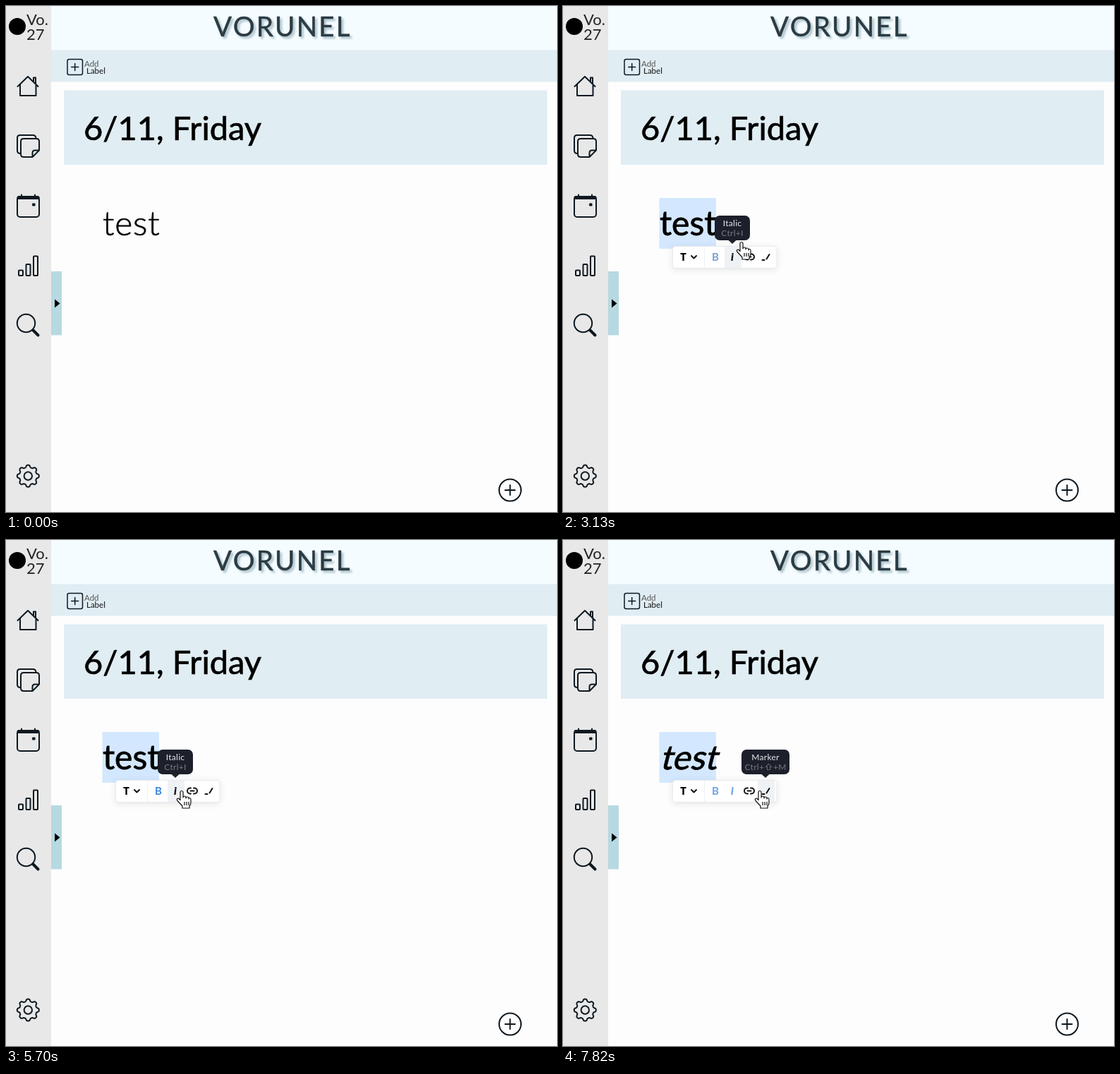
An HTML page for the animation above (7.99 s loop, 781 by 717 pixels).

```html
<!DOCTYPE html>
<html lang="en">
<head>
<meta charset="utf-8">
<title>Note editor</title>
<style>
  html, body { margin: 0; width: 100%; height: 100%; overflow: hidden; background: #fdfdfd; }
  svg { display: block; width: 100vw; height: 100vh; font-family: Lato, Inter, sans-serif; }
  .line { fill: none; stroke: #0d1820; stroke-width: 2; stroke-linejoin: round; stroke-linecap: round; }
  .title { font-size: 47px; stroke: #000; stroke-width: .7; }
  .plain { font-weight: 300; letter-spacing: .8px; stroke: #000; stroke-width: .6; }
  .strong { stroke: #000; stroke-width: .8; }
  .brand { font-size: 38.5px; letter-spacing: 2.3px; fill: #2b3b43; stroke: #2b3b43; stroke-width: .5;
           filter: drop-shadow(3px 3px 1.5px rgba(70, 110, 125, .4)); }
  .bar { filter: drop-shadow(0 2px 4px rgba(13, 20, 33, .1)); }
  .glyph { fill: none; stroke: #111; stroke-width: 2; stroke-linecap: round; stroke-linejoin: round; }
  .tip { font-size: 12px; letter-spacing: .3px; text-anchor: middle; }
</style>
</head>
<body>
<svg viewBox="0 0 781 717" preserveAspectRatio="none">
  <rect width="781" height="717" fill="#fdfdfd"/>
  <rect width="64" height="717" fill="#e8e8e8"/>
  <rect x="64" width="717" height="62.5" fill="#f4fcff"/>
  <rect x="64" y="62.5" width="717" height="45" fill="#e0edf3"/>
  <rect x="82" y="119.5" width="685" height="105.5" fill="#e0edf3"/>
  <rect x="64" y="376" width="15" height="90.5" fill="#b7d9e1"/>
  <path d="M69 415.5L76.5 421.5L69 427.5Z"/>

  <circle cx="16" cy="29" r="12"/>
  <g font-size="22" fill="#222">
    <text x="29" y="27">Vo.</text>
    <text x="29" y="48">27</text>
  </g>
  <text class="brand" x="392" y="43" text-anchor="middle">VORUNEL</text>

  <g class="line">
    <path d="M16.5 114L31 100L45.5 114M20 111V127H42.5V111M39 107V101.5H42V110"/>
    <path d="M20.5 209Q16 209 16 205V187Q16 183 20 183H38Q42 183 42.5 187"/>
    <path d="M25 188H43Q47 188 47 192V204.5L37.5 214H25Q21 214 21 210V192Q21 188 25 188ZM37.5 214V208Q37.5 204.5 41 204.5H47"/>
    <rect x="16" y="270" width="31" height="29" rx="4"/>
    <path d="M18 271.5H45" stroke-width="5"/>
    <path d="M22 267.5V270M41 267.5V270"/>
    <rect x="38" y="280" width="3" height="3" fill="#0d1820" stroke-width="1"/>
    <rect x="18" y="374.5" width="6" height="7.5" rx="1"/>
    <rect x="28.500" y="366" width="6" height="16" rx="1"/>
    <rect x="39" y="354.5" width="6" height="27.5" rx="1"/>
    <circle cx="28.5" cy="449.5" r="12.7"/>
    <path d="M38.5 459.5L45.5 466.5" stroke-width="4"/>
    <path id="gear"/>
    <circle cx="31.3" cy="666" r="5.7"/>
    <circle cx="714.5" cy="686" r="15.5"/>
    <path d="M714.5 679V693M707.5 686H721.5"/>
    <g stroke-width="1.5">
      <rect x="87" y="75.5" width="21.5" height="22" rx="2.5"/>
      <path d="M97.7 81.5V91.5M92.7 86.5H102.7"/>
    </g>
  </g>
  <text x="111" y="86" font-size="11.5" fill="#555">Add</text>
  <text x="114" y="96" font-size="11.5" fill="#111">Label</text>
  <text class="title" x="110" y="190">6/11, Friday</text>

  <rect id="selection" y="272" height="72" fill="#d3e8fe"/>
  <g transform="translate(137 325)"><text id="word" font-size="48">test</text></g>

  <g id="toolbar">
    <rect class="bar" x="155.5" y="340.5" width="147.5" height="31" rx="4" fill="#fff" stroke="#e9eaed"/>
    <rect id="hover" y="341" width="24" height="30" fill="#eff2f5"/>
    <path d="M200.5 341V371" stroke="#eeeff2"/>
    <text x="170.5" y="360.5" font-size="14" font-weight="900" text-anchor="middle">T</text>
    <path class="glyph" d="M182 354L185.5 357.5L189 354"/>
    <text id="bold" x="216" y="360.5" font-size="15" font-weight="700" text-anchor="middle">B</text>
    <text id="italic" x="240" y="360.5" font-size="15" font-weight="900" font-style="italic" text-anchor="middle">i</text>
    <path class="glyph" d="M262 351.5H261A4 4 0 0 0 261 359.5H262M266 351.5H267A4 4 0 0 1 267 359.5H266M261.5 355.5H266.5"/>
    <path class="glyph" d="M282.5 360H285.5M288.5 358.5L292.5 352"/>
  </g>

  <g id="tooltip">
    <rect id="tipBox" y="297" height="35" rx="7" fill="#1d202b"/>
    <path d="M-6 331.5H6L0 337Z" fill="#1d202b"/>
    <text class="tip" id="tipName" y="312" fill="#e8e9ee"></text>
    <text class="tip" id="tipKeys" y="325.5" fill="#757985"></text>
  </g>

  <g id="cursor">
    <circle id="press" r="17" fill="#f6ee19" fill-opacity=".72"/>
    <path id="arrow" d="M0 0V16L4 12.5L6.5 18.5L9 17.3L6.5 11.5H12Z" fill="#fff" stroke="#111"/>
    <g id="beam" fill="none">
      <path d="M-5 -11H-2Q0 -11 0 -9V9Q0 11 -2 11H-5M5 -11H2Q0 -11 0 -9V9Q0 11 2 11H5" stroke="#fff" stroke-width="3"/>
      <path d="M-5 -11H-2Q0 -11 0 -9V9Q0 11 -2 11H-5M5 -11H2Q0 -11 0 -9V9Q0 11 2 11H5" stroke="#111" stroke-width="1.2"/>
    </g>
    <path id="hand" fill="#fff" stroke="#111" stroke-width="1.2" stroke-linejoin="round"
      d="M-2 1.5a2 2 0 0 1 4 0V9q0-2 2-2t2 2v1q0-2 2-2t2 2v1q0-1.5 1.5-1.5T13 11.5V16q0 3-2 5v3H1v-3L-6 13.5q-1.5-2 0-3t2.5.5L-2 12.5ZM4 15v5M7 15v5M10 15v5"/>
  </g>
</svg>
<script>
const LOOP = 7990;
const BOLD_AT = 2700, ITALIC_AT = 5870;
const el = Object.fromEntries([...document.querySelectorAll('[id]')].map(node => [node.id, node]));

// Pointer stops: time, x, y
const path = [
  [130, 739, 717], [900, 279, 310], [930, 279, 310], [1090, 209, 306], [1220, 209, 306],
  [1700, 226, 304], [1800, 226, 304], [2150, 113, 304], [2190, 113, 304], [2500, 207, 354],
  [2560, 207, 354], [2650, 214, 358], [3080, 214, 358], [3130, 253, 335], [3160, 253, 335],
  [3450, 300, 312], [3600, 300, 312], [3840, 226, 304], [4190, 226, 304], [4570, 145, 304],
  [4800, 134, 304], [4900, 134, 304], [5460, 249, 356], [6000, 249, 356], [6200, 300, 312],
  [6340, 300, 312], [6580, 226, 304], [6660, 226, 304], [6950, 165, 305], [7140, 143, 304],
  [7230, 143, 304], [7630, 280, 358], [7819, 280, 358], [7820, 279, 356]
];

// Selections: press, preview of the toolbar, release, deselect, tint of active tools
const drags = [
  { down: 1790, preview: 2040, up: 2180, clear: 3480, tint: '#779fd0' },
  { down: 4180, preview: 4510, up: 4860, clear: 6210, tint: '#3a86dd' },
  { down: 6650, preview: 6890, up: 7215, clear: LOOP, tint: '#6aa3e8' }
];
const clicks = [[2650, 2760], [3470, 3570], [5840, 5950], [6200, 6300]];
const tips = [
  { from: 2590, to: 3090, x: 216, width: 52, name: 'Bold', keys: 'Ctrl+B' },
  { from: 3090, to: 3240, x: 240, width: 50, name: 'Italic', keys: 'Ctrl+I' },
  { from: 5580, to: 6060, x: 240, width: 50, name: 'Italic', keys: 'Ctrl+I' },
  { from: 7540, to: LOOP, x: 287, width: 68, name: 'Marker', keys: 'Ctrl+⇧+M' }
];

const clamp = v => Math.max(0, Math.min(1, v));
const ease = v => v * v * (3 - 2 * v);
const set = (node, attrs) => Object.entries(attrs).forEach(([k, v]) => node.setAttribute(k, v));
const show = (node, on) => { node.style.display = on ? '' : 'none'; };

function pointer(t) {
  const next = path.findIndex(stop => stop[0] > t);
  if (next < 0) return path[path.length - 1].slice(1);
  if (next === 0) return path[0].slice(1);
  const a = path[next - 1], b = path[next];
  const k = ease((t - a[0]) / (b[0] - a[0]));
  return [a[1] + (b[1] - a[1]) * k, a[2] + (b[2] - a[2]) * k];
}

// Left edge of the selection, snapped to a letter
function selectionStart(x) {
  if (x < 144) return 136.5;
  if (x < 163) return 153;
  if (x < 188) return 178.5;
  return x < 208 ? 201 : 217;
}

function drawToolbar(t, drag) {
  show(el.toolbar, drag && t >= drag.preview);
  if (!drag) return;
  const since = t - drag.up - 40;
  const shown = since >= 0;
  const grow = ease(clamp(since / 150));
  const fade = shown ? .25 + .75 * clamp(since / 220) : .25 * clamp((t - drag.preview) / 50);
  const dx = shown ? 0 : 22.5;
  const dy = 4.5 * (1 - grow);
  set(el.toolbar, {
    opacity: fade,
    transform: `translate(${229 + dx} ${355.5 + dy}) scale(${.94 + .06 * grow}) translate(-229 -355.5)`
  });
  el.bold.style.fill = t >= BOLD_AT ? drag.tint : '#111';
  el.italic.style.fill = t >= ITALIC_AT ? drag.tint : '#111';
}

function drawTooltip(t) {
  const tip = tips.find(item => t >= item.from && t < item.to);
  show(el.tooltip, tip);
  show(el.hover, tip);
  if (!tip) return;
  set(el.tooltip, { transform: `translate(${tip.x} 0)`, opacity: clamp((t - tip.from + 30) / 70) });
  set(el.tipBox, { x: -tip.width / 2, width: tip.width });
  set(el.hover, { x: tip.x - 11 });
  el.tipName.textContent = tip.name;
  el.tipKeys.textContent = tip.keys;
}

function drawCursor(t, x, y) {
  const pressed = drags.some(d => t >= d.down && t < d.up) ||
    clicks.some(([from, to]) => t >= from && t < to);
  const onToolbar = x > 155 && x < 303 && y > 334 && y < 372;
  const kind = t < 960 ? 'arrow' : onToolbar ? 'hand' : 'beam';
  for (const name of ['arrow', 'hand', 'beam']) show(el[name], name === kind);
  show(el.cursor, t >= 130);
  show(el.press, pressed);
  set(el.cursor, { transform: `translate(${x} ${y})` });
}

function draw(t) {
  const [x, y] = pointer(t);
  const drag = drags.find(d => t >= d.down && t < d.clear);
  const start = !drag ? 217 : t < drag.up ? selectionStart(x) : 136.5;
  set(el.selection, { x: start, width: 217 - start });
  set(el.word, {
    class: t >= BOLD_AT ? 'strong' : 'plain',
    transform: t >= ITALIC_AT ? 'skewX(-14)' : ''
  });
  drawToolbar(t, drag);
  drawTooltip(t);
  drawCursor(t, x, y);
}

// Eight rounded teeth around the hub
const gearPoints = Array.from({ length: 160 }, (_, i) => {
  const a = i * Math.PI / 80;
  const r = 13.9 + 1.7 * Math.tanh(1.6 * Math.cos(8 * a));
  return `${(31.3 + r * Math.sin(a)).toFixed(2)} ${(666 - r * Math.cos(a)).toFixed(2)}`;
});
set(el.gear, { d: `M${gearPoints.join('L')}Z` });

const began = performance.now();
function tick() {
  draw((performance.now() - began) % LOOP);
  requestAnimationFrame(tick);
}
tick();
</script>
</body>
</html>
```
